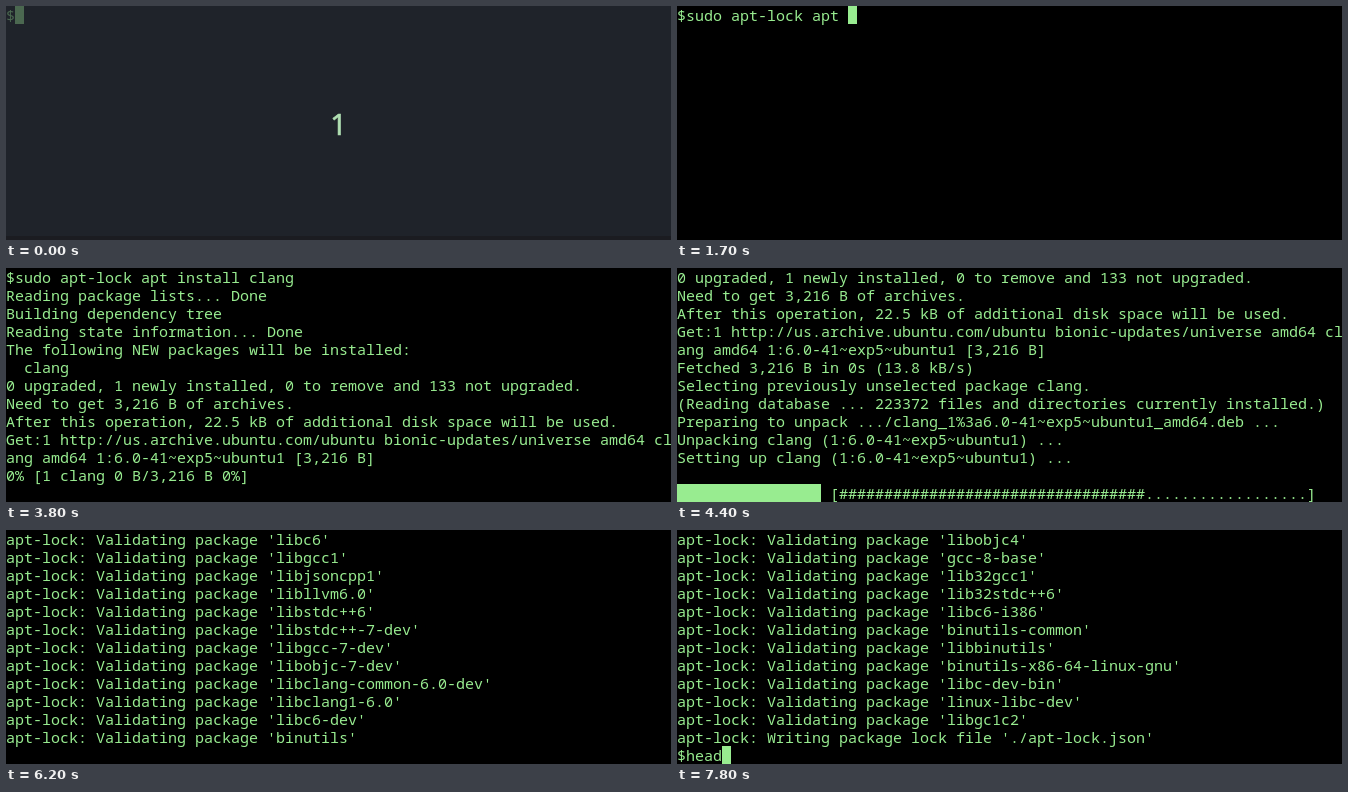
These frames come from a looping animation (665x234 px, 8 s). An HTML page:

```html
<!DOCTYPE html>
<html lang="en">
<head>
<meta charset="utf-8">
<title>Terminal session</title>
<style>
  html, body { margin: 0; width: 100%; height: 100%; overflow: hidden; background: #000; }
  #stage { position: relative; width: 665px; height: 234px; overflow: hidden; background: #000; --ink: #98ec90; }
  #screen {
    position: absolute; inset: 0; margin: 0; white-space: pre; color: var(--ink);
    font: 15px/18px "Noto Sans Mono", monospace; font-variant-ligatures: none;
  }
  #cursor, #badge { position: absolute; left: 0; top: 0; height: 18px; background: var(--ink); }
  #cursor { width: 9px; }
  #badge { width: 144px; top: 216px; }
  #count {
    position: absolute; inset: 0; display: none; text-align: center; color: #b0dfb2;
    font: 29px/236px "Noto Sans", sans-serif; -webkit-text-stroke: 0.6px;
  }
  #stage.intro { background: linear-gradient(#1f232a 230px, #1b1c21 230px); --ink: #4b6850; }
  .intro #count { display: block; }
</style>
</head>
<body>
<div id="stage">
  <div id="cursor"></div>
  <div id="badge"></div>
  <pre id="screen"></pre>
  <div id="count">1</div>
</div>
<script>
const LOOP = 8000, CELL_W = 9, CELL_H = 18, ROWS = 13, BAR = 52;
const $ = id => document.getElementById(id);
const stage = $('stage'), screenEl = $('screen'), cursor = $('cursor'), badge = $('badge');

const command = 'sudo apt-lock apt install clang';
const packages = ('clang libc6 libgcc1 libjsoncpp1 libllvm6.0 libstdc++6 libstdc++-7-dev libgcc-7-dev ' +
  'libobjc-7-dev libclang-common-6.0-dev libclang1-6.0 libc6-dev binutils libedit2 libffi6 libtinfo5 ' +
  'zlib1g gcc-7-base libgomp1 libitm1 libatomic1 libasan4 liblsan0 libtsan0 libubsan0 libcilkrts5 ' +
  'libmpx2 libquadmath0 libobjc4 gcc-8-base lib32gcc1 lib32stdc++6 libc6-i386 binutils-common ' +
  'libbinutils binutils-x86-64-linux-gnu libc-dev-bin linux-libc-dev libgc1c2').split(' ');

const log = [
  '$' + command,
  'Reading package lists... Done',
  'Building dependency tree',
  'Reading state information... Done',
  'The following NEW packages will be installed:',
  '  clang',
  '0 upgraded, 1 newly installed, 0 to remove and 133 not upgraded.',
  'Need to get 3,216 B of archives.',
  'After this operation, 22.5 kB of additional disk space will be used.',
  'Get:1 http://us.archive.ubuntu.com/ubuntu bionic-updates/universe amd64 cl',
  'ang amd64 1:6.0-41~exp5~ubuntu1 [3,216 B]',
  'Fetched 3,216 B in 0s (13.8 kB/s)',
  'Selecting previously unselected package clang.',
  '(Reading database ... 223372 files and directories currently installed.)',
  'Preparing to unpack .../clang_1%3a6.0-41~exp5~ubuntu1_amd64.deb ...',
  'Unpacking clang (1:6.0-41~exp5~ubuntu1) ...',
  'Setting up clang (1:6.0-41~exp5~ubuntu1) ...',
  'Processing triggers for man-db (2.8.3-2ubuntu0.1) ...',
  ...packages.map(p => `apt-lock: Validating package '${p}'`),
  "apt-lock: Writing package lock file './apt-lock.json'"
];
const aptEnd = 18;

// Each scene: finished lines, first visible line, unfinished line, cursor, progress bar
const scenes = [];
const at = (time, lines, opts) =>
  scenes.push({ time, lines, top: 0, tail: '', cur: false, bar: -1, ...opts });
const type = (text, lines, top, keys) =>
  keys.forEach(([time, n]) => at(time, lines, { top, tail: '$' + text.slice(0, n), cur: true }));

type(command, 0, 0, [[0, 0], [300, 1], [400, 2], [600, 4], [700, 5], [800, 7],
  [1000, 8], [1100, 9], [1200, 10], [1300, 12], [1400, 13], [1500, 15], [1600, 16],
  [1700, 18], [1800, 20], [1900, 22], [2000, 24], [2200, 26], [2300, 29], [2400, 31]]);
at(2800, 1);
at(3100, 1, { cur: true });
at(3200, 1, { tail: 'Reading package lists... 0%' });
at(3300, 2, { tail: 'Building dependency tree... 50%' });
at(3500, 4);
at(3700, 9, { tail: '0% [Working]' });
at(3800, 11, { tail: '0% [1 clang 0 B/3,216 B 0%]' });
at(3900, 12);
at(4200, 13, { top: 2, tail: '(Reading database ... 55%', bar: 9 });
at(4300, 16, { top: 5, bar: 26 });
at(4400, 17, { top: 6, bar: 34 });
at(4700, 18, { top: 7, bar: 43 });
at(5000, 18, { top: 7, bar: 43, cur: true });
at(5100, 18, { top: 7, bar: 43 });
at(5400, 18, { top: 8 });
at(5500, 18, { top: 8, cur: true });
at(5900, 18, { top: 8 });
at(6000, 19, { top: 8 });
[[6200, 13], [6300, 18], [6400, 23], [6500, 28], [6600, 33], [6800, 37], [7000, 39]].forEach(([time, n]) =>
  at(time, aptEnd + n, { top: aptEnd + n - 12, cur: time > 6200 && time < 6800 }));
type('head', log.length, log.length - 12, [[7200, 0], [7600, 1], [7700, 2], [7800, 4]]);

let shown = null;

function show(s) {
  const rows = log.slice(s.top, s.lines);
  const row = rows.push(s.tail) - 1;
  const hasBar = s.bar >= 0;
  if (hasBar) {
    while (rows.length < ROWS - 1) rows.push('');
    rows.push(' '.repeat(17) + '[' + '#'.repeat(s.bar) + '.'.repeat(BAR - s.bar) + ']');
  }
  screenEl.textContent = rows.join('\n');
  badge.hidden = !hasBar;
  cursor.hidden = !s.cur;
  cursor.style.transform = `translate(${s.tail.length * CELL_W}px, ${row * CELL_H}px)`;
}

function tick() {
  const t = performance.now() % LOOP;
  const scene = scenes.findLast(s => s.time <= t);
  if (scene !== shown) show(shown = scene);
  stage.classList.toggle('intro', t < 100);
  requestAnimationFrame(tick);
}
tick();
</script>
</body>
</html>
```
